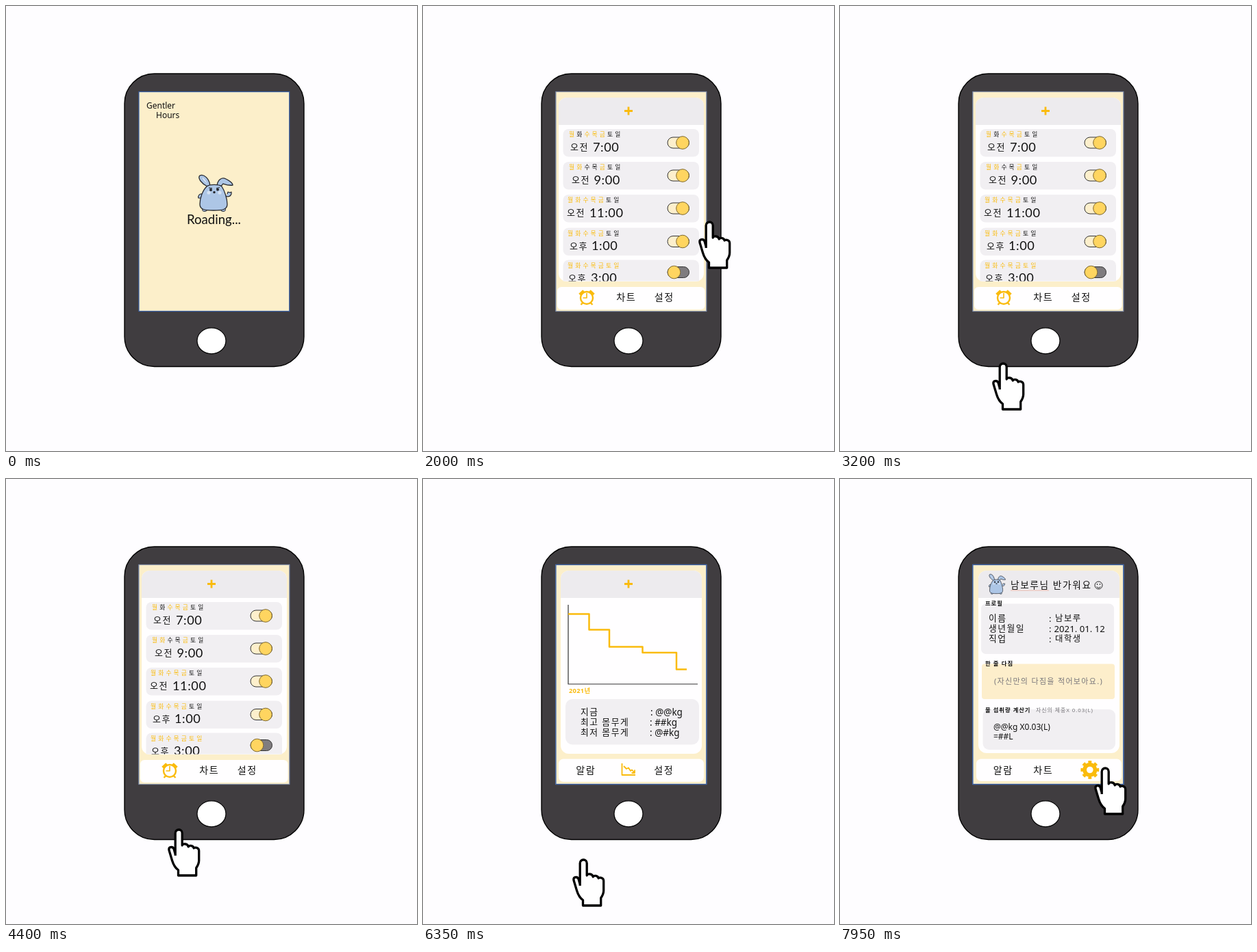
An HTML page for the animation above (8 s loop, 600 by 651 pixels).

```html
<!DOCTYPE html>
<html lang="ko">
<head>
<meta charset="utf-8">
<style>
  html, body { margin: 0; width: 100%; height: 100%; overflow: hidden; background: #fefdff; }
  svg { display: block; width: 600px; height: 651px; }
  text { font: 14px 'Noto Sans', 'Noto Sans CJK KR', sans-serif; fill: #111; white-space: pre; }
  .cal { font-family: Lato, sans-serif; }
  .time { letter-spacing: .03em; }
  .hangul { letter-spacing: .12em; }
</style>
</head>
<body>
<svg id="stage" viewBox="0 0 600 651"></svg>
<script>
const YELLOW = '#fabb0c', GREY = '#f1eff2', CREAM = '#fcefca';

const rect = (x, y, right, bottom, r, fill, extra = '') =>
  `<rect x="${x}" y="${y}" width="${right - x}" height="${bottom - y}" rx="${r}" fill="${fill}" ${extra}/>`;
// Hangul is set smaller and looser than Latin text
const text = (x, y, size, str, style = '', cls = '') => {
  const hangul = /[가-힣]/.test(str);
  return `<text x="${x}" y="${hangul ? y - size * .04 : y}" class="${hangul ? 'hangul' : cls}" ` +
    `style="font-size:${hangul ? size * .88 : size}px;${style}">${str}</text>`;
};
const path = (d, stroke, width, fill = 'none') =>
  `<path d="${d}" fill="${fill}" stroke="${stroke}" stroke-width="${width}" stroke-linejoin="round"/>`;
const page = (id, body, border = '#3a62a8') =>
  `<g id="${id}">${rect(194, 125.5, 413.7, 446.5, 0, CREAM, `stroke="${border}" stroke-width="1.2"`)}${body}</g>`;

// White panel with a grey header
const panel = (x, right, bottom) => rect(x, 134, right, bottom, 12, '#fffeff') +
  `<path d="M${x} 174V146a12 12 0 0 1 12-12H${right - 12}a12 12 0 0 1 12 12V174z" fill="#edebee"/>`;
const plus = path('M294 153.5H306M300 147.5V159.5', YELLOW, 2.8);
const navText = (x, str) => text(x + .8, 432, 16, str, 'text-anchor:middle');

const bunny = () => {
  const ink = '#26282e', blue = '#adc6e6';
  return path('M294 264C286 260 279 252 283 248C289 245 297 253 298 263', ink, 1.3, blue) +
    path('M292 259C287 255 285 251 286 250C290 251 293 256 294 260', '#87a3cc', .6, '#d3e0f2') +
    path('M308 263C309 254 315 250 321 253C327 256 331 259 331 262C325 263 320 261 317 260C315 262 314 264 312 265', ink, 1.3, blue) +
    path('M287 275C282 274 280 278 281 281L285 281M320 278C325 280 328 278 329 275L329 272L327 273L324 272L323 275', ink, 1.2, blue) +
    `<g fill="${blue}" stroke="${ink}"><ellipse cx="290" cy="298" rx="3.5" ry="2.5"/><ellipse cx="317" cy="298" rx="3.5" ry="2.5"/></g>` +
    path('M293 264C297 260.5 311 260.5 315 264C319 270 323 282 323 290C323 298 316 299 303 299C290 299 283 298 283 290C283 281 287 270 293 264Z', ink, 1.3, blue) +
    '<g fill="#d5e2f3"><circle cx="296" cy="273" r="2.6"/><circle cx="312" cy="273" r="2.6"/></g>' +
    `<g fill="${ink}"><circle cx="299" cy="269" r="2"/><circle cx="309" cy="268.5" r="2"/><circle cx="304" cy="272.5" r="1.7"/></g>` +
    path('M296 266L301 266.5M307 266.5L312 265.5', ink, 1);
};

const loading = page('loading',
  text(205, 150, 12, 'Gentler') + text(219, 164, 12, 'Hours') + bunny() +
  text(264, 319, 18.6, 'Roading...', '', 'cal'));

// Alarm list: [card top, first day x, label x, label, time x, time, highlighted days, on]
const alarms = [
  [180, 213, 215, '오전', 248, '7:00', '월수목금', true],
  [228, 213, 217, '오전', 249.5, '9:00', '월화금', true],
  [276, 211, 210, '오전', 243, '11:00', '월화수목금', true],
  [324.5, 211, 214, '오후', 246, '1:00', '월화수목금', true],
  [371.5, 211, 212, '오후', 245, '3:00', '월화수목금토일', false]
];
const toggle = (y, on) =>
  rect(357, y - 8, 388.5, y + 8, 8, on ? '#fdefcc' : '#7f7c7f', 'stroke="#333"') +
  `<circle cx="${on ? 379 : 366.5}" cy="${y}" r="9.3" fill="#ffd560" stroke="#806a30"/>`;
const alarmRow = ([y, dayX, labelX, label, timeX, time, active, on]) =>
  rect(204.5, y, 403, y + 40.5, 8, GREY) +
  [...'월화수목금토일'].map((day, i) =>
    text(dayX + i * 11.2, y + 11.5, 10, day, active.includes(day) ? 'fill:' + YELLOW : '')).join('') +
  text(labelX, y + 32, 14.8, label) + text(timeX, y + 32.7, 18.2, time, '', 'cal time') +
  toggle(y + (on ? 20 : 18), on);
const clock = path('M239 420V427H233.5', YELLOW, 1.6) +
  `<circle cx="239" cy="427" r="9" fill="none" stroke="${YELLOW}" stroke-width="2.4"/>` +
  path('M233 434.5L230.5 437M245 434.5L247.5 437', YELLOW, 2.4) +
  path('M228.5 422L234.5 416.5M249.5 422L243.5 416.5', YELLOW, 3.6);
const alarm = page('alarm',
  panel(198, 410, 403) + plus +
  `<clipPath id="list"><rect x="198" y="174" width="212" height="228.5"/></clipPath>
   <g clip-path="url(#list)">${alarms.map(alarmRow).join('')}</g>` +
  rect(196, 411, 411.5, 444, 6, '#fffeff') + clock + navText(296, '차트') + navText(351.5, '설정'), '#8d95a6');

const chart = page('chart',
  panel(201, 407, 402) + plus +
  path('M212 184V300H401', '#333', 1.2) +
  path('M212 197.5H242.5V220.5H272V245.5H320.5V254H370V278.5H385', YELLOW, 2.5) +
  text(213, 313.5, 10.6, '2021년', 'font-weight:700;letter-spacing:.03em;fill:' + YELLOW) +
  rect(208, 322, 403, 388.5, 10, GREY) +
  [['지금', 332, '@@kg'], ['최고 몸무게', 331, '##kg'], ['최저 몸무게', 331, '@#kg']].map(([name, x, value], i) =>
    text(230, 345.5 + i * 15, 14.5, name) + text(x, 345.5 + i * 15, 13.5, ': ' + value)).join('') +
  rect(198, 409.5, 410, 443, 7, '#fffeff') + navText(237, '알람') + navText(351, '설정') +
  path('M290.5 416V433H310', YELLOW, 1.8) + path('M293 420L297 424L300 422.5L303 427L305 425.5L308.5 429.5M309 425.5V430H304.5', YELLOW, 1.8));

const BOLD = 'font-weight:700', FAINT = 'fill:#77757a';
const gear = `<g fill="none" stroke="${YELLOW}"><circle cx="364.8" cy="425.5" r="7.7" stroke-width="5.8"/>
  <circle cx="364.8" cy="425.5" r="11.4" stroke-width="4" pathLength="16" stroke-dasharray="1.1 .9" stroke-dashoffset=".55"/></g>`;
const settings = page('settings',
  panel(202, 408, 401) +
  `<g transform="translate(217 138.5) scale(.48 .55) translate(-280 -246)">${bunny()}</g>` +
  text(249, 160.5, 15.5, '남보루님 반가워요') + path('M249 163H305M314 210.5H353', '#ecae9c', .8) +
  '<circle cx="377.5" cy="155.5" r="5.5" fill="none" stroke="#222"/>' +
  path('M374.5 157.5Q377.5 161 380.5 157.5M375.5 153V155M379.5 153V155', '#222', 1) +
  rect(206, 182.5, 400, 256, 7, GREY) + text(212, 185, 9.4, '프로필', BOLD) +
  [['이름', '남보루'], ['생년월일', '2021. 01. 12'], ['직업', '대학생']].map(([name, value], i) =>
    text(217, 209 + i * 15, 14.5, name) + text(305, 209 + i * 15, 13.2, ':') +
    text(i === 1 ? 312.5 : 314, 209 + i * 15, i === 1 ? 13.2 : 14.1, value)).join('') +
  rect(207, 270.5, 401, 322, 4, '#fdeecb') + text(212, 273, 9.5, '한 줄 다짐', BOLD) +
  text(304.5, 300, 12.5, '(자신만의 다짐을 적어보아요.)', FAINT + ';text-anchor:middle') +
  rect(208.5, 337, 402, 396, 9, GREY) + text(212, 341, 9.4, '물 섭취량 계산기', BOLD) +
  text(286, 341.5, 9, '자신의 체중X 0.03(L)', FAINT) +
  text(224, 367, 12, '@@kg X0.03(L)') + text(224, 381, 12, '=##L') +
  rect(199, 409.5, 411, 442, 7, '#fffeff') + navText(237.5, '알람') + navText(296, '차트') + gear);

const hand = `<g id="hand">${path('M11.2 40V7a5 5 0 0 1 10 0V25c1-3 8-3 9 2c2-2.5 7-2 8 2c3-2 7.5 0 7.5 4V47q0 5-4 11V69H15.5V61Q9.5 57 6.5 47L2 32c-1-5 5-6 7-2l2.2 8', '#000', 3.3, '#fff')}</g>`;

const $ = id => document.getElementById(id);
$('stage').innerHTML =
  rect(173, 99, 435, 527.5, 43.7, '#403d40', 'stroke="#000" stroke-width="1.4"') +
  '<ellipse cx="300" cy="489.8" rx="21" ry="19" fill="#fff" stroke="#000" stroke-width="1.2"/>' +
  loading + alarm + chart + settings + hand;

// Hand keys: [ms, x, y]
const route = [
  [450, 284, 524], [700, 284, 524], [1250, 300, 463], [2000, 402, 314], [2250, 469, 297],
  [2600, 365, 430], [2780, 280, 492], [2950, 242, 509], [3200, 222, 521], [3450, 218, 555],
  [3850, 218, 555], [4400, 236, 511], [4750, 281, 424], [4950, 281, 424], [5400, 319, 498],
  [5500, 331, 508], [5800, 300, 540], [6150, 218, 555], [6400, 218, 555], [7200, 324, 462],
  [7400, 371, 421], [8000, 371, 421]
];

// Smooth curve through the keys, at rest where two neighbours agree
function slope(i, axis) {
  const a = route[i - 1], b = route[i], c = route[i + 1];
  if (!a || !c || a[axis] === b[axis] || b[axis] === c[axis]) return 0;
  return (c[axis] - a[axis]) / (c[0] - a[0]);
}
function along(t, axis) {
  if (t <= route[0][0]) return route[0][axis];
  const i = route.findIndex(key => key[0] > t) - 1;
  const a = route[i], b = route[i + 1], span = b[0] - a[0], u = (t - a[0]) / span;
  const s = u * u * (3 - 2 * u);
  return a[axis] + (b[axis] - a[axis]) * s +
    span * u * (1 - u) * ((1 - u) * slope(i, axis) - u * slope(i + 1, axis));
}

const fade = (t, start, length) => Math.min(1, Math.max(0, (t - start) / length));

function draw() {
  const t = Math.floor(performance.now() % 8000 / 50) * 50;
  $('alarm').setAttribute('opacity', fade(t, 400, 700));
  $('chart').setAttribute('opacity', fade(t, 4650, 650));
  $('settings').setAttribute('opacity', fade(t, 7200, 700));
  $('hand').setAttribute('opacity', fade(t, 400, 700));
  $('hand').setAttribute('transform', `translate(${along(t, 1)} ${along(t, 2)})`);
  requestAnimationFrame(draw);
}
draw();
</script>
</body>
</html>
```
